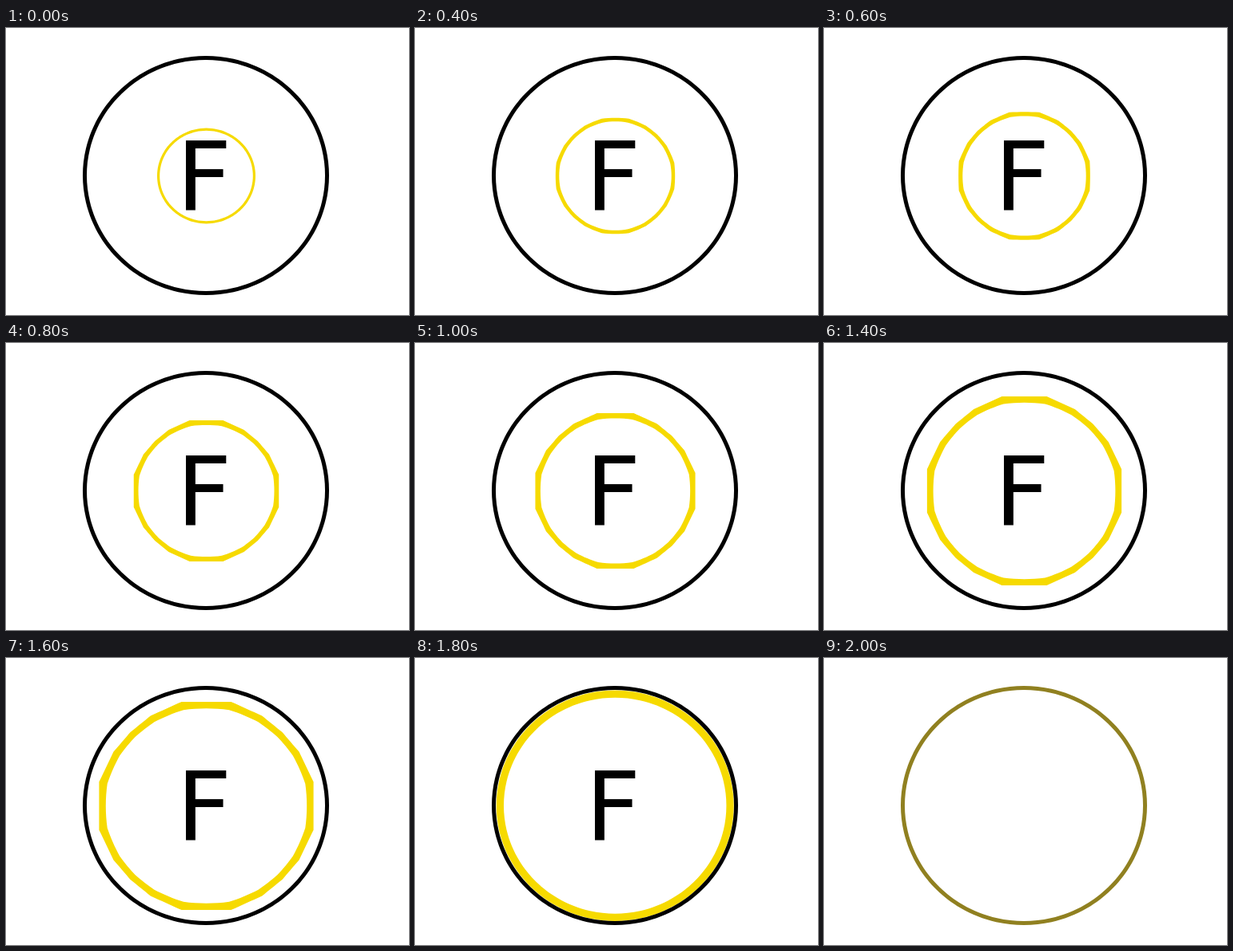
An HTML page with a canvas that plays this animation: 504 by 360 pixels, repeating every 2500 ms.

```html
<!DOCTYPE html>
<html lang="en">
<head>
<meta charset="utf-8">
<title>Growing ring</title>
<style>
html, body { margin: 0; width: 100%; height: 100%; overflow: hidden; background: #fff; }
canvas { display: block; }
</style>
</head>
<body>
<canvas id="stage" width="504" height="360"></canvas>
<script>
const ctx = document.getElementById("stage").getContext("2d");
const LOOP = 2500, STEP = 100;
const YELLOW = "#f6da00", OLIVE = "#908020";
const rad = Math.PI / 180;

// Corners of the faceted ring: [angle, radius] in one quadrant
const quarter = [[13, 1.025], [31, 1.008], [45, 1], [59, 1.008], [77, 1.025]];
const corners = [0, 90, 180, 270].flatMap(q => quarter.map(([a, r]) => [a + q, r]));

function onCircle(angle, r) {
  return [r * Math.cos(angle * rad), r * Math.sin(angle * rad)];
}

function mix(a, b, k) {
  return a + (b - a) * k;
}

// facet 0 gives a smooth ellipse, 1 gives straight edges
function outline(cx, cy, rx, ry, facet) {
  corners.forEach(([a, ra], i) => {
    let [b, rb] = corners[(i + 1) % corners.length];
    if (b < a) b += 360;
    const p = onCircle(a, ra), q = onCircle(b, rb);
    for (let k = 0; k < 1; k += 0.125) {
      const [x, y] = onCircle(mix(a, b, k), 1);
      const px = cx + rx * mix(x, mix(p[0], q[0], k), facet);
      const py = cy + ry * mix(y, mix(p[1], q[1], k), facet);
      if (i || k) ctx.lineTo(px, py);
      else ctx.moveTo(px, py);
    }
  });
  ctx.closePath();
}

function ring(cx, cy, w, h, line, color, facet) {
  ctx.beginPath();
  outline(cx, cy, w / 2, h / 2, facet);
  outline(cx, cy, w / 2 - line, h / 2 - line, facet * 0.4);
  ctx.fillStyle = color;
  ctx.fill("evenodd");
}

function rim(color) {
  ring(250, 185, 308, 300, 5, color, 0);
}

function letter() {
  ctx.fillStyle = "#000";
  ctx.font = "120px 'DejaVu Sans', sans-serif";
  ctx.fillText("F", 213.3, 228.5);
}

function draw(now) {
  const n = Math.min(20, Math.floor((now % LOOP) / STEP));
  ctx.fillStyle = "#fff";
  ctx.fillRect(0, 0, 504, 360);
  if (n < 18) {
    const grow = 1.05 ** n;
    ring(250.5, 185.5, 123 * grow, 119.8 * grow, 3.2 + 0.33 * n, YELLOW, Math.min(1, n / 8));
  } else if (n === 18) {
    ring(250.2, 185.2, 297, 289.5, 9.3, YELLOW, 0);
  }
  rim(n < 19 ? "#000" : OLIVE);
  if (n < 20) letter();
}

const start = performance.now();
function tick() {
  draw(performance.now() - start);
  requestAnimationFrame(tick);
}
tick();
</script>
</body>
</html>
```
